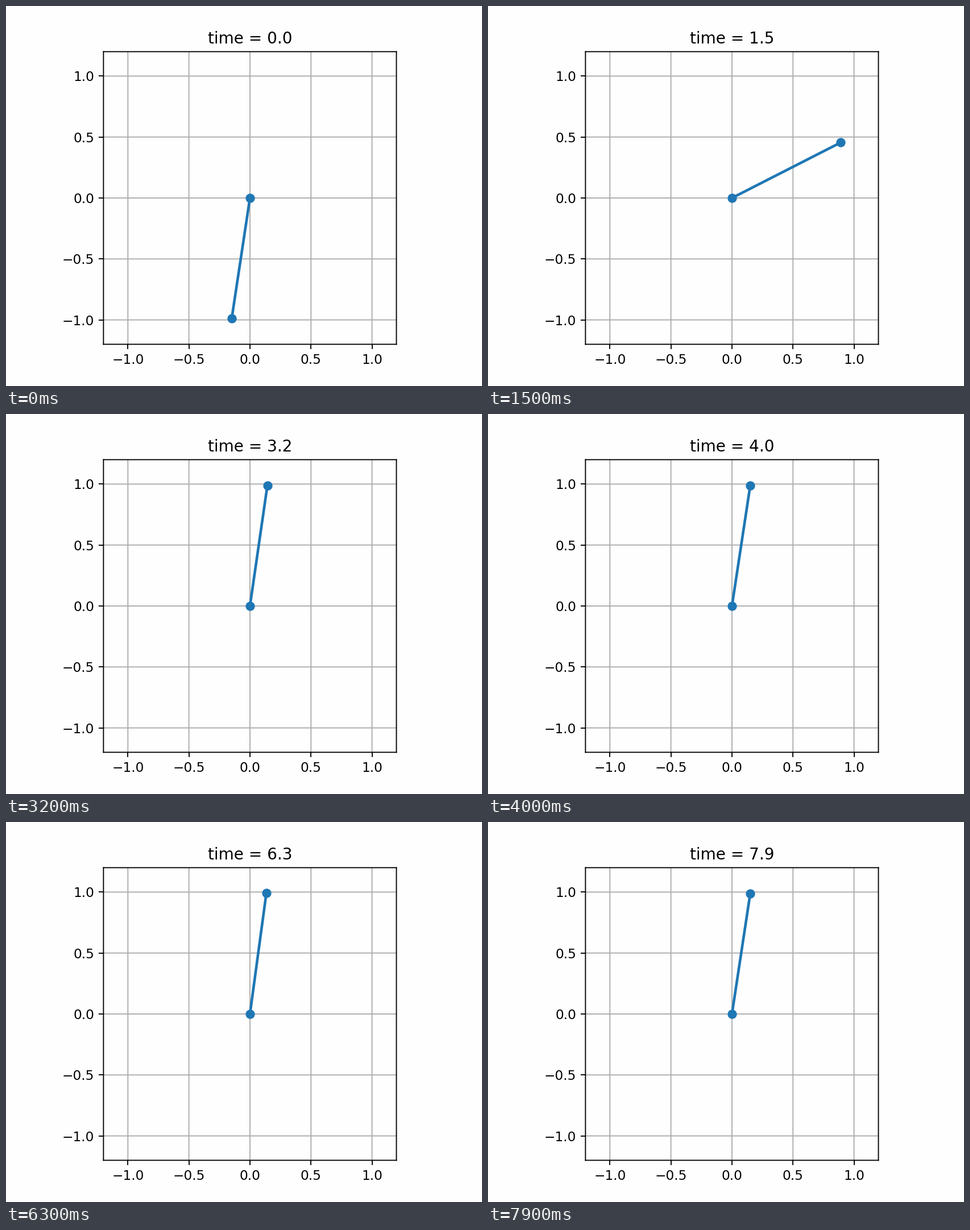
Recreate the animation shown at these times as a matplotlib script. Size 837 by 669 pixels, loop 8 s.

```python
import numpy as np
import matplotlib.pyplot as plt
from matplotlib.animation import FuncAnimation

W, H, DPI = 837, 669, 167.4
FRAMES, STEP = 80, 0.1

START, BACK, TOP = -0.15, -1.27, 2.999  # angles from straight down, rad
T_BACK = 0.5                            # end of the back swing, s


def angle(t):
    if t < T_BACK:
        ease = (1 - np.cos(np.pi * t / T_BACK)) / 2
        return START + (BACK - START) * ease
    # Swing up, then balance with a slight sway.
    u = t - T_BACK
    rise = 1 - np.exp(-1.24 * u ** 1.7 - 0.26 * u ** 4)
    sway = -0.008 * np.cos(2 * np.pi * (t - 4) / 0.65)
    return BACK + (TOP + sway - BACK) * rise


plt.rcParams.update({
    "path.snap": False,
    "figure.facecolor": "#fefefe",
    "axes.facecolor": "#fefefe",
    "grid.color": "#ababab",
})
fig = plt.figure(figsize=(W / DPI, H / DPI), dpi=DPI)
fig.subplots_adjust(bottom=0.1098, top=0.8798)
ax = fig.add_subplot(xlim=(-1.2, 1.2), ylim=(-1.2, 1.2), aspect="equal")
ticks = np.arange(-1, 1.1, 0.5)
ax.set_xticks(ticks)
ax.set_yticks(ticks)
ax.grid()
rod, = ax.plot([], [], "o-", lw=2)
title = ax.set_title("time = 0.0")


def update(n):
    t = n * STEP
    a = angle(t)
    rod.set_data([0, np.sin(a)], [0, -np.cos(a)])
    title.set_text(f"time = {t:.1f}")
    return rod, title


anim = FuncAnimation(fig, update, frames=FRAMES, interval=1000 * STEP,
                     repeat=True, repeat_delay=0)
plt.show()
```
